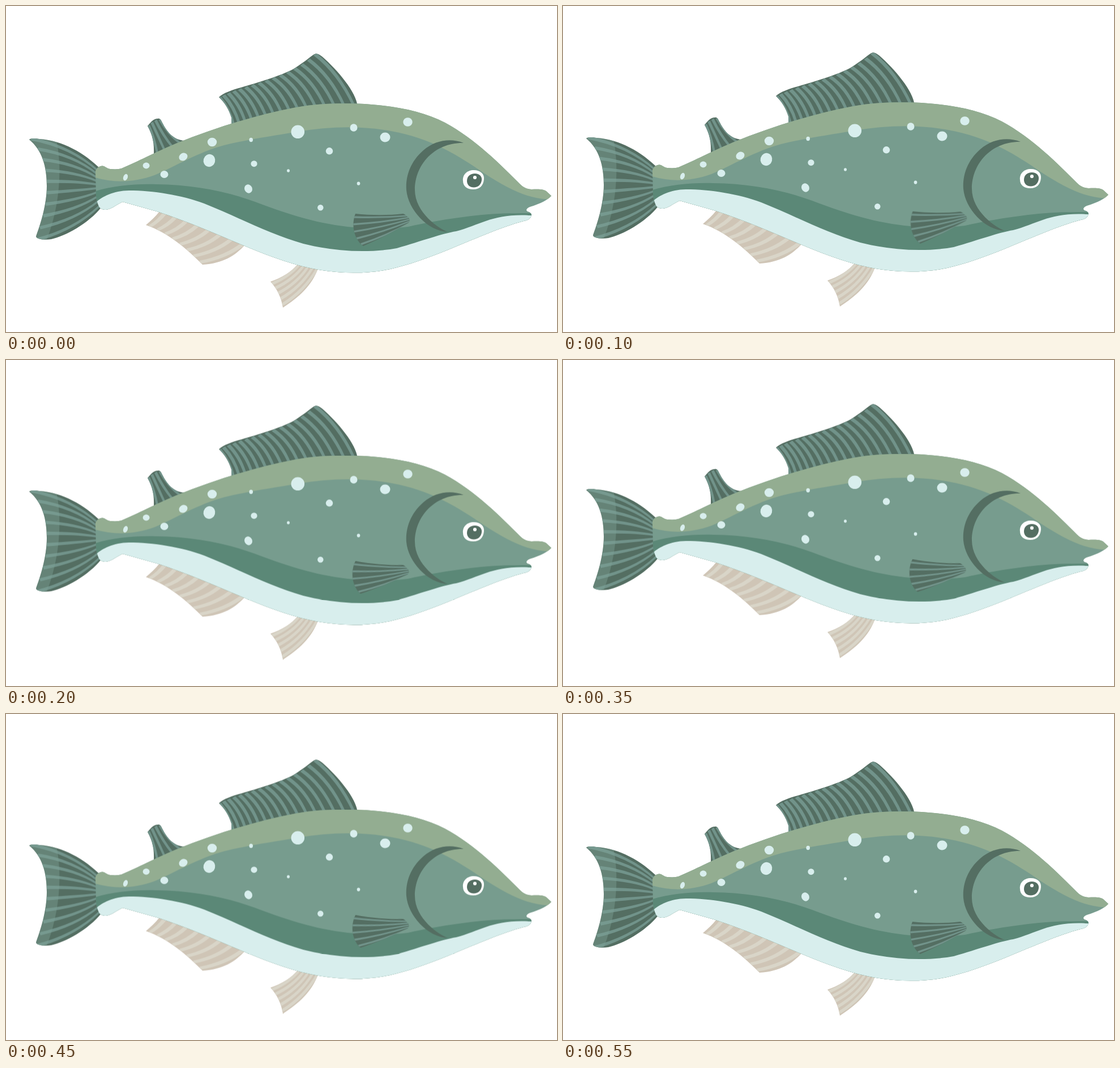
Write an HTML page that moves like this. It is 973 px wide and 576 px high and loops after 0.65 s.

```html
<!DOCTYPE html>
<html lang="en">
<head>
<meta charset="utf-8">
<title>Swimming fish</title>
<style>
  html, body { margin: 0; width: 100%; height: 100%; overflow: hidden; background: #fff; }
  svg { display: block; width: 100vw; height: 100vh; }
  #fish { animation: bob 650ms step-end infinite; }
  #paddle { transform-origin: 712px 376px; animation: paddle 650ms step-end infinite; }

  @keyframes bob {
    0%      { transform: translateY(0); }
    15.385% { transform: translateY(-2px); }
    30.769% { transform: translateY(-3.5px); }
    53.846% { transform: translateY(-6.3px); }
    69.231% { transform: translateY(-3.5px); }
    84.615%, 100% { transform: translateY(0); }
  }
  @keyframes paddle {
    0%      { transform: none; }
    15.385% { transform: translate(.5px, -1.5px) rotate(.5deg); }
    30.769% { transform: translate(-1px, -.5px) rotate(4.8deg); }
    53.846% { transform: translate(-1px, -.8px) rotate(4.9deg); }
    69.231% { transform: translate(-1px, -.5px) rotate(4.8deg); }
    84.615%, 100% { transform: none; }
  }
</style>
</head>
<body>
<svg viewBox="0 0 973 576">
  <defs>
    <path id="outline" d="M158 292C160 286 165 282.5 170 282.5C175 282.5 177 287 184 288C192 288.7 200 288.5 204 287C235 274 260 260 300 243C370 215 440 193 510 179.5C545 172.5 585 171.5 621 172.5C680 175 733 184 775 206C830 236 873 280 908 315C914 321 920 323.5 928 324C940 323.5 951 323 956 329L963 335.5C957 342 945 349 925 355C920 357 917 361 921 363C925 364 928 366 928 370C926 376 922 378.5 914 380C850 397 760 445 690 462C650 473 600 474 555 466.5C460 450 380 400 270 364L206 346C197 350 191 355 185 357.5C176 362 167 360 164 354C161 347 159.500 341 159 336Z"/>
    <clipPath id="inBody"><use href="#outline"/></clipPath>
  </defs>
  <g id="fish">
    <g id="fins"></g>
    <use href="#outline" fill="#779c8e"/>
    <g clip-path="url(#inBody)">
      <path fill="#93ad91" d="M150 301L157 303C190 313 226 312 262 299C300 283 340 258 385 246C430 235 470 230 515 222C570 213 625 211 680 221C750 233 800 265 845 296C885 322 920 340 956 341.500L973 342V150H150Z"/>
      <path fill="#5b8877" d="M150 329L158 327C190 318 225 314 265 315C330 316 385 326 440 346C500 369 555 386 614 391C650 394 680 394 710 390C740 383 790 374 840 369C870 366 900 366 940 366V500H150Z"/>
      <path fill="#d8eeed" d="M150 356L160 346C168 338 190 326 217 326C260 326 310 334 350 349C410 373 465 403 525 420C580 434 640 437 690 428C735 415 770 402 795 398C840 386 860 366 928 370V500H150Z"/>
    </g>
    <path fill="#546e62" d="M808 242C785 233 758 237 737 255C715 274 705 300 707 325C710 360 745 398 780 399C765 394 722 365 722 325C722 280 757 241 808 242Z"/>
    <g id="spots" fill="#d8eeed"></g>
    <path fill="#fff" d="M807 309C806 298 814 290 826 290C838 290 845 297 844 306C843 317 837 324 825 324C814 324 807 318 807 309Z"/>
    <path fill="#546e62" d="M814 309C814 301 820 296 828 296C836 296 841 301 840 308C839 315 834 320.500 826 320.500C819 320.500 814 316 814 309Z"/>
    <circle cx="828" cy="303" r="3.100" fill="#fff"/>
    <g id="paddle"></g>
  </g>
</svg>
<script>
  const NS = 'http://www.w3.org/2000/svg';
  const $ = id => document.getElementById(id);
  const DARK = '#546e62', TEAL = '#71938a', SAND = '#cfc5b6', CREAM = '#d9d5c8';

  function add(parent, tag, attrs) {
    const el = document.createElementNS(NS, tag);
    for (const k in attrs) el.setAttribute(k, attrs[k]);
    return parent.appendChild(el);
  }

  const mix = (a, b, t) => a + (b - a) * t;

  // point on a cubic curve given as x0 y0 ... x3 y3
  function at(c, t) {
    const u = 1 - t, k = [u * u * u, 3 * u * u * t, 3 * u * t * t, t * t * t];
    return [0, 1].map(j => k.reduce((s, w, i) => s + w * c[2 * i + j], 0));
  }

  // tapered ray bowed by (bx, by), w0 wide at its start and w1 at its end
  function ray([x0, y0], [x1, y1], bx, by, w0, w1) {
    const len = Math.hypot(x1 - x0, y1 - y0);
    const nx = (y0 - y1) / len / 2, ny = (x1 - x0) / len / 2, w = (w0 + w1) / 2;
    const cx = (x0 + x1) / 2 + bx, cy = (y0 + y1) / 2 + by;
    return `M${x0 + nx * w0} ${y0 + ny * w0}Q${cx + nx * w} ${cy + ny * w} ${x1 + nx * w1} ${y1 + ny * w1}` +
      `L${x1 - nx * w1} ${y1 - ny * w1}Q${cx - nx * w} ${cy - ny * w} ${x0 - nx * w0} ${y0 - ny * w0}Z`;
  }

  let count = 0;
  function fin(parent, f) {
    const id = 'fin' + count++;
    add(add(parent, 'clipPath', { id }), 'path', { d: f.d });
    add(parent, 'path', { d: f.d, fill: f.fill });
    const g = add(parent, 'g', { 'clip-path': `url(#${id})` });
    let d = '';
    for (let i = 0; i < f.n; i++) {
      const t = Math.pow((i + .5) / f.n, f.pow || 1), [a, b] = f.bow;
      d += ray(at(f.outer, t), at(f.inner, t), mix(a[0], b[0], t), mix(a[1], b[1], t), f.w[0], f.w[1]);
    }
    add(g, 'path', { d, fill: f.ray });
    return g;
  }

  const fins = $('fins');

  const tail = fin(fins, {
    d: 'M41 236C44 233 52 234 60 235C100 238 138 259 168 289V356C146 384 104 407 80 412C69 414 53 412 53 407C60 388 72 352 72 318C72 284 64 255 41 236Z',
    fill: DARK, ray: TEAL, n: 10, w: [6, 3.5],
    outer: [38, 226, 86, 284, 78, 352, 48, 424], inner: [164, 289, 158, 307, 158, 327, 166, 358],
    bow: [[10, -17], [12, 14]]
  });
  add(tail, 'path', {
    d: 'M30 225H86C99 270 99 345 71 415H30Z', fill: '#7da397', opacity: .4
  });

  fin(fins, {
    d: 'M250 212C255 206 260 199 268 199C273 198 274 203 277 208C286 225 297 237 316 238L300 262H261C262 243 259 228 250 212Z',
    fill: DARK, ray: TEAL, n: 4, w: [5, 4],
    outer: [249, 214, 256, 206, 264, 199, 276, 200], inner: [261, 262, 277, 258, 296, 248, 318, 242],
    bow: [[4, -3], [-6, 6]]
  });

  fin(fins, {
    d: 'M376 161C383 154 400 148 415 144C445 135 484 124 508 111C524 101 536 91 543 86C549 82 553 86 559 90C585 113 619 152 621 178L560 190L398 212V197C393 181 386 171 376 161Z',
    fill: DARK, ray: TEAL, n: 16, pow: 1.12, w: [6.5, 5],
    outer: [374, 163, 420, 137, 500, 132, 551, 80], inner: [398, 211, 460, 191, 540, 176, 623, 176],
    bow: [[5, -4], [7, -14]]
  });

  fin(fins, {
    d: 'M247 387C256 379 264 372 271 363L350 380L422 422C405 441 383 455 347 457C318 428 287 401 247 387Z',
    fill: SAND, ray: CREAM, n: 8, w: [5.500, 7],
    outer: [247, 387, 284, 399, 320, 429, 348, 458], inner: [271, 363, 320, 379, 375, 402, 428, 425],
    bow: [[2, 2], [8, 8]]
  });

  fin(fins, {
    d: 'M467 487C487 480 504 470 517 454L551 464C540 494 517 515 489 533C486 515 479 500 467 487Z',
    fill: SAND, ray: CREAM, n: 5, w: [5.500, 4.500],
    outer: [467, 487, 477, 498, 486, 515, 489, 533], inner: [515, 455, 527, 459, 539, 463, 553, 466],
    bow: [[5, 5], [9, 7]]
  });

  fin($('paddle'), {
    d: 'M617 367C645 370 676 370 701 367C706 368 707 372 711 374C713 377 713 380 711 383C688 396 660 412 631 424C617 415 608 390 617 367Z',
    fill: DARK, ray: TEAL, n: 5, w: [3.500, 2.500],
    outer: [617, 367, 608, 386, 614, 413, 632, 425], inner: [709, 369, 712, 374, 713, 380, 711, 386],
    bow: [[0, 3], [3, 3]]
  });

  // x, y, rx, ry, tilt
  const spots = [
    [709.5, 205, 8.2, 7.8], [614, 215, 6.5, 6.8], [669.5, 232, 9, 8.5], [515.3, 222.3, 11.8, 11.8],
    [571, 256.300, 6.2, 6.2], [498.5, 291, 2.5, 2.7], [622.5, 313.6, 2.8, 3.2], [555.3, 356.3, 5.2, 5.2],
    [432.7, 236.500, 3.3, 3.7], [438, 278.7, 5.6, 5.5], [428, 323, 6.8, 7.8, -25], [364, 240.5, 8.2, 7.8],
    [359, 273, 10.3, 11.2, 15], [313, 266.5, 7.8, 6.6, -30], [279.5, 297.5, 7, 6.5],
    [247.6, 282, 6, 5.4], [211, 302.600, 3.8, 6, 20]
  ];
  for (const [cx, cy, rx, ry, tilt = 0] of spots)
    add($('spots'), 'ellipse', { cx, cy, rx, ry, transform: `rotate(${tilt} ${cx} ${cy})` });
</script>
</body>
</html>
```
